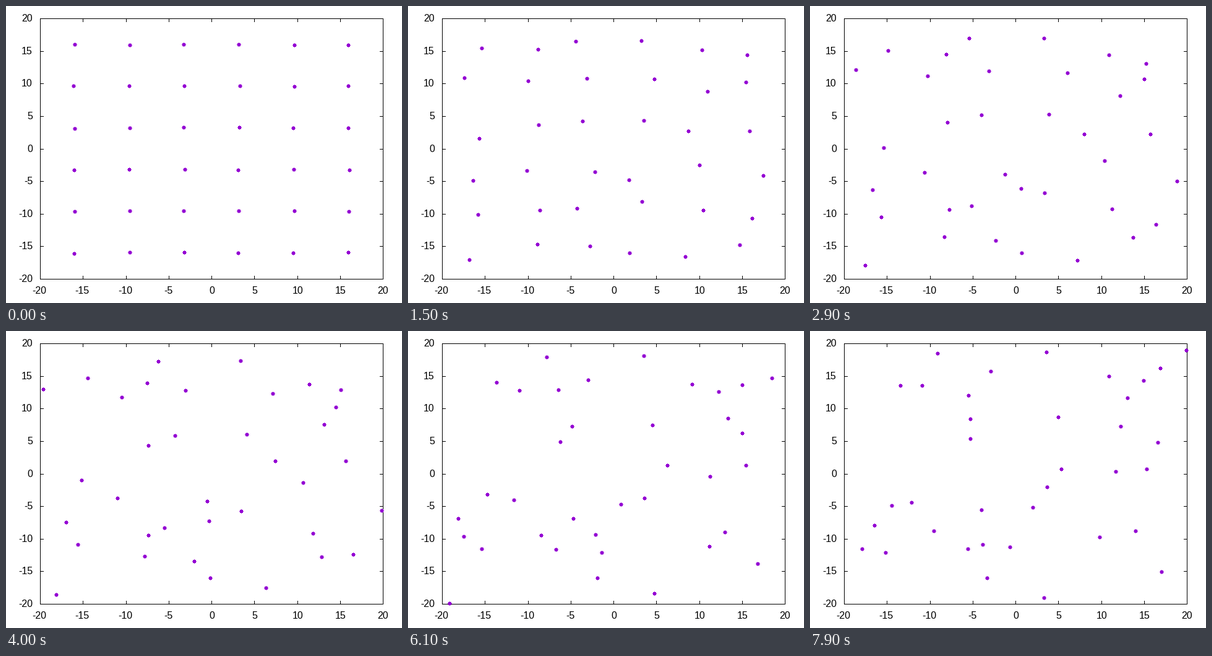
These frames come from a looping animation (640x480 px, 8000 ms). A matplotlib script:

```python
import numpy as np
import matplotlib.pyplot as plt
from matplotlib.animation import FuncAnimation
from matplotlib.collections import PolyCollection
from matplotlib.patches import Rectangle

W, H, DPI = 640, 480, 100
LEFT, RIGHT, TOP, BOTTOM = 55, 609, 20, 441
SPAN = np.array([RIGHT - LEFT, BOTTOM - TOP])
CORNER = np.array([LEFT, TOP])
FRAMES = 80
TIC = 5

# Velocities in pixels per step, row by row from the top left.
VEL = np.array([
    (.525, .345), (.7125, .524), (-1.021, -.326), (.071, -.351), (.6, .573), (-.353, 1.03),
    (-1.23, -.869), (-.3, -.536), (.06, -.806), (1.334, -.706), (1.195, .52), (-.453, -.39),
    (.29, 1.08), (.75, -.285), (-.358, -.683), (.309, -.722), (-.7375, .328), (-.115, .328),
    (-.33, 1.1), (-.46, .145), (.905, .26), (-1.178, 1.044), (.3675, -.47), (1.305, .6225),
    (.14, .328), (.867, -.083), (-.89, -.283), (.084, -.994), (.76, -.112), (.18, .72),
    (-.705, .664), (.6, -.863), (.41, -.663), (-1.131, 0), (-1.0875, .401), (-1.07, -.828),
])

# Collisions: first particle, second particle, step, velocity change of the first.
HITS = [
    (5, 11, 34.5, .295, -1.42),
    (26, 25, 37.6, 1.427, -.469),
    (11, 10, 50, -.06, -.305),
    (31, 25, 52.5, .3, .81),
    (21, 32, 70.5, -.3, -.31),
    (0, 7, 73, -.89, -.22),
    (12, 19, 77.5, -.7, -.3),
]


def to_px(x, y):
    return (LEFT + (x + 20) / 40 * SPAN[0], BOTTOM - (y + 20) / 40 * SPAN[1])


grid = np.linspace(-16, 16, 6)
START = np.array([to_px(x, y) for y in grid[::-1] for x in grid])

# Dot outline: a 5 px square with a 1 px nub on each side.
DOT = np.array([(-2, -2), (0, -2), (0, -3), (1, -3), (1, -2), (3, -2),
                (3, 0), (4, 0), (4, 1), (3, 1), (3, 3), (1, 3),
                (1, 4), (0, 4), (0, 3), (-2, 3), (-2, 1), (-3, 1),
                (-3, 0), (-2, 0)])


def positions(frame):
    t = frame + 1
    pos = START + VEL * t
    for i, j, hit, dx, dy in HITS:
        shift = np.array([dx, dy]) * np.logaddexp(0, t - hit)
        pos[i] += shift
        pos[j] -= shift
    pos = CORNER + (pos - CORNER) % SPAN
    return np.floor(pos + .5)


fig = plt.figure(figsize=(W / DPI, H / DPI), dpi=DPI, facecolor="white")
ax = fig.add_axes([0, 0, 1, 1])
ax.set_xlim(0, W)
ax.set_ylim(H, 0)
ax.axis("off")


def bar(x, y, w, h):
    ax.add_patch(Rectangle((x, y), w, h, fc="black", lw=0, aa=False))


def label(x, y, value, ha):
    ax.text(x, y, str(value), ha=ha, va="baseline",
            family="Liberation Sans", size=16 * 72 / DPI)


for y in (TOP, BOTTOM):
    bar(LEFT, y, SPAN[0] + 1, 1)
for x in (LEFT, RIGHT):
    bar(x, TOP, 1, SPAN[1] + 1)

for v in range(-20, 21, 5):
    x, y = (int(np.floor(c + .5)) for c in to_px(v, v))
    bar(x, TOP, 1, TIC + 1)
    bar(x, BOTTOM - TIC, 1, TIC + 1)
    bar(LEFT, y, TIC + 1, 1)
    bar(RIGHT - TIC, y, TIC + 1, 1)
    label(x + (.5 if v >= 0 else -1), 465, v, "center")
    label(43, y + 5, v, "right")

dots = PolyCollection([], facecolors="#9400d3", linewidths=0,
                      antialiaseds=False, zorder=5)
ax.add_collection(dots, autolim=False)


def draw(frame):
    dots.set_verts([p + DOT for p in positions(frame)])
    return (dots,)


anim = FuncAnimation(fig, draw, frames=FRAMES, interval=100,
                     repeat=True, repeat_delay=0, blit=False)
plt.show()
```
